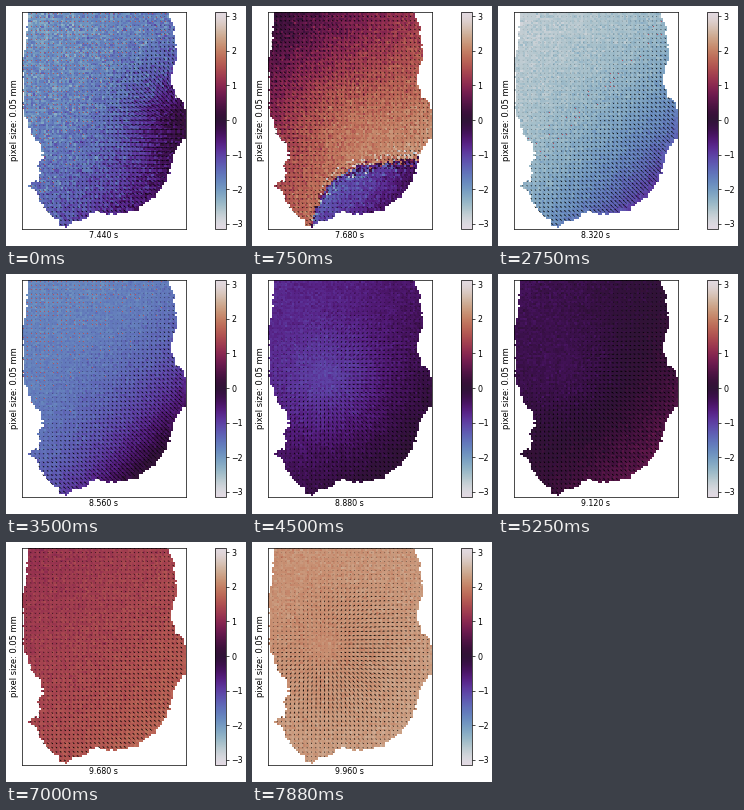
Write a matplotlib script that moves like this. It is 240 px wide and 240 px high and loops after 8 s.

```python
import numpy as np
import matplotlib.pyplot as plt
from matplotlib.animation import FuncAnimation
from matplotlib.path import Path

FRAMES, STEP = 64, 0.04
NX, NY = 76, 100
LEFT, RIGHT, TOP, BOTTOM = 15.5, 179.5, 5.5, 222.5
FONT = 5.65
MEAN_ARROW = 2.1

plt.rcParams.update({"font.family": "DejaVu Sans", "font.size": FONT,
                     "axes.linewidth": 0.5})

# Key poses of the wave: step, base phase, slope, bend, middle hill.
POSES = np.array([
    (0, -2.0, 0.5, 0.9, 0.0),
    (6, 0.1, 2.2, 0.0, 0.4),
    (15, 2.4, 0.9, 0.7, 0.0),
    (28, 4.5, 0.1, 1.55, 0.05),
    (36, 5.5, 0.6, 0.2, -0.55),
    (49, 6.4, 0.7, 0.3, 0.1),
    (63, 8.45, 0.15, 0.0, -0.12)])

# Tissue border, clockwise from the top left.
OUTLINE = Path([
    (22, 5), (160, 5), (166, 16), (171, 44), (171, 54), (166, 62), (165, 78),
    (168, 88), (175, 95), (180, 104), (180, 130), (172, 140), (166, 152),
    (164, 165), (158, 178), (150, 190), (130, 204), (114, 208), (100, 209),
    (92, 205), (83, 208), (80, 214), (64, 217), (62, 221), (53, 221),
    (50, 214), (38, 203), (28, 184), (22, 181), (22, 177), (33, 176),
    (34, 168), (30, 160), (36, 153), (36, 141), (24, 128), (22, 118),
    (17, 110), (16, 52), (20, 44)])

dx, dy = (RIGHT - LEFT) / NX, (BOTTOM - TOP) / NY
gx, gy = np.meshgrid(LEFT + (np.arange(NX) + 0.5) * dx,
                     TOP + (np.arange(NY) + 0.5) * dy)
points = np.column_stack([gx.ravel(), gy.ravel()])
rng = np.random.default_rng(7)
outside = ~OUTLINE.contains_points(
    points + rng.normal(0, 0.6, points.shape)).reshape(gx.shape)
grain = rng.normal(size=gx.shape)


def bump(x, y, radius):
    return np.exp(-((gx - x) ** 2 + (gy - y) ** 2) / (2 * radius ** 2))


# Distance along the wave's way, top left to bottom right.
way = (0.8 * (gx - LEFT) / (RIGHT - LEFT)
       + (gy - TOP) / (BOTTOM - TOP)) / 1.45
middle, east = bump(80, 110, 42), bump(178, 115, 32)
front = 145 + 1100 / np.maximum(gx - 45, 8)


def wave(k):
    base, slope, bend, hill = (np.interp(k, POSES[:, 0], col)
                               for col in POSES.T[1:])
    glow = 0.9 * max(0, 1 - k / 6)
    return base + slope * way + bend * way ** 4 + hill * middle + glow * east


def flow(phase):
    """Arrows run against the phase gradient, with a fixed mean length."""
    down, across = np.gradient(phase, dy, dx)
    size = np.hypot(across, down)
    length = MEAN_ARROW * np.minimum(size / size[~outside].mean(), 3)
    turn = length / np.maximum(size, 1e-9)
    return -across * turn, down * turn


def state(k):
    phase = wave(k)
    u, v = flow(phase)
    fresh = np.random.default_rng(100 + k).normal(size=gx.shape)
    noise = 0.07 + 0.12 * np.exp(-k / 10)
    # A ragged front sweeps down over tissue still at rest.
    gap = gy - front - 14 * (k - 6) + 2.5 * grain
    edge = np.exp(-(gap / 6) ** 2) * np.clip(k / 6, 0, 1)
    phase = np.where(gap > 0, wave(0), phase)
    phase += (noise + 0.7 * edge) * 0.7 * (grain + fresh)
    u, v = u * (1 + edge), v * (1 + edge)
    return (phase + np.pi) % (2 * np.pi) - np.pi, u, v


def box(x0, y0, x1, y1):
    return [x0 / 240, 1 - y1 / 240, (x1 - x0) / 240, (y1 - y0) / 240]


fig = plt.figure(figsize=(2.4, 2.4), dpi=100, facecolor="white")
ax = fig.add_axes(box(LEFT, TOP, RIGHT, BOTTOM))
img = ax.imshow(np.ma.array(gx * 0, mask=outside), cmap="twilight",
                vmin=-np.pi, vmax=np.pi, interpolation="nearest",
                extent=(LEFT, RIGHT, BOTTOM, TOP), aspect="auto")
skip = (slice(None, None, 2), slice(None, None, 2))
hidden = outside[skip]
arrows = ax.quiver(gx[skip], gy[skip], gx[skip] * 0, gy[skip] * 0,
                   angles="uv", units="dots", scale_units="dots",
                   scale=1, width=0.45)
dots, = ax.plot([], [], "s", color="#b5525f", ms=0.75, mew=0)
ax.set(xlim=(LEFT, RIGHT), ylim=(BOTTOM, TOP), xticks=[], yticks=[])
fig.text(9 / 240, 1 - 114 / 240, "pixel size: 0.05 mm", rotation=90,
         ha="center", va="center", fontsize=FONT * 1.06)
clock = fig.text(97.5 / 240, 1 - 230 / 240, "", ha="center", va="center")

bar = fig.colorbar(img, cax=fig.add_axes(box(208.5, TOP, 219.5, BOTTOM)),
                   ticks=range(-3, 4))
bar.ax.tick_params(width=0.5, length=2, pad=2, labelsize=FONT)
bar.outline.set_linewidth(0.5)


def draw(k):
    phase, u, v = state(k)
    img.set_data(np.ma.array(phase, mask=outside))
    u, v = u[skip], v[skip]
    arrows.set_UVC(np.ma.array(u, mask=hidden), np.ma.array(v, mask=hidden))
    # Slow points in the blue phase show as red dots.
    slow = (np.hypot(u, v) < 1.6) & (abs(phase[skip] + 2) < 0.3) & ~hidden
    dots.set_data(gx[skip][slow], gy[skip][slow])
    clock.set_text(f"{7.44 + STEP * k:.3f} s")
    return img, arrows, dots, clock


anim = FuncAnimation(fig, draw, frames=FRAMES, interval=125,
                     repeat=True, repeat_delay=0, blit=False)
plt.show()
```
